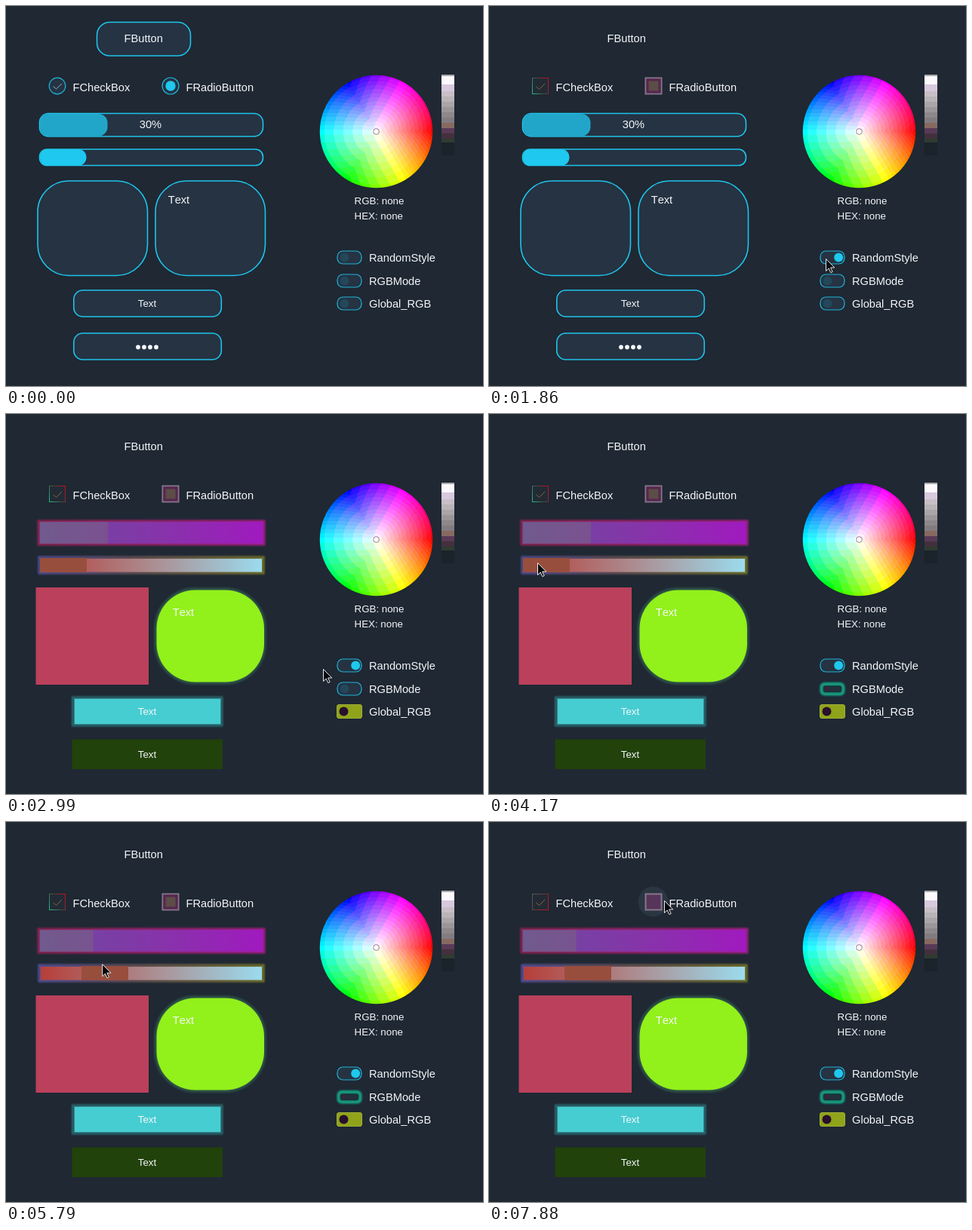
Recreate the animation shown at these times as an HTML page with a canvas. Size 632x504 px, loop 8000 ms.

```html
<!DOCTYPE html>
<html lang="en">
<head>
<meta charset="utf-8">
<title>Controls</title>
<style>
html, body { margin: 0; width: 100%; height: 100%; overflow: hidden; background: #1f2833; }
#stage { position: absolute; left: 0; top: 0; width: 632px; height: 504px; }
#wheel { position: absolute; left: 415px; top: 91px; }
svg { position: absolute; left: 0; top: 0; }
text { font: 14.67px "Liberation Sans", Arial, sans-serif; font-kerning: none; fill: #f4f6f8; }
.small { font-size: 13.33px; font-kerning: normal; text-anchor: middle; }
.info { font-size: 13.33px; }
.box { fill: #253343; stroke: #1fc4ea; stroke-width: 1.6; }
.thin { stroke: #1fb4d8; stroke-width: 1.2; }
.lit { fill: #1fc8ee; }
.dim { fill: #22485a; }
</style>
</head>
<body>
<div id="stage">
<canvas id="wheel" width="151" height="151"></canvas>
<svg width="632" height="504" viewBox="0 0 632 504">
  <defs>
    <linearGradient id="violet" gradientUnits="userSpaceOnUse" x1="44" y1="0" x2="341" y2="0">
      <stop stop-color="#6b4ba0"/><stop offset=".5" stop-color="#8436a8"/><stop offset="1" stop-color="#a01abf"/>
    </linearGradient>
    <linearGradient id="crimson" gradientUnits="userSpaceOnUse" x1="43" y1="0" x2="342" y2="0">
      <stop stop-color="#8e2452"/><stop offset="1" stop-color="#a01e86"/>
    </linearGradient>
    <linearGradient id="sunset" gradientUnits="userSpaceOnUse" x1="45" y1="0" x2="340" y2="0">
      <stop stop-color="#b63e38"/><stop offset=".5" stop-color="#ac8c90"/><stop offset="1" stop-color="#9bdcef"/>
    </linearGradient>
    <linearGradient id="rim" gradientUnits="userSpaceOnUse" x1="43" y1="0" x2="342" y2="0">
      <stop stop-color="#56509a"/><stop offset=".4" stop-color="#665058"/><stop offset="1" stop-color="#77762c"/>
    </linearGradient>
    <linearGradient id="edgeA" gradientUnits="userSpaceOnUse" x1="57" y1="112" x2="79" y2="100">
      <stop stop-color="#27b083"/><stop offset=".5" stop-color="#4b4440"/><stop offset="1" stop-color="#c01024"/>
    </linearGradient>
    <linearGradient id="edgeB" gradientUnits="userSpaceOnUse" x1="57" y1="100" x2="79" y2="112">
      <stop stop-color="#4f5a5c"/><stop offset=".5" stop-color="#70323a"/><stop offset="1" stop-color="#c41022"/>
    </linearGradient>
    <filter id="soft" x="-20%" y="-30%" width="140%" height="160%"><feGaussianBlur stdDeviation="1.2"/></filter>
  </defs>

  <!-- button -->
  <rect data-to="1400" class="box" x="120.5" y="21.5" width="124" height="44.5" rx="17" stroke-width="1.8"/>
  <rect id="hover" x="119" y="20" width="127" height="47" fill="#fff" opacity="0"/>
  <text x="156.5" y="48">FButton</text>

  <!-- check box -->
  <circle id="checkHalo" cx="68" cy="106" r="20" fill="#2a3641" opacity="0"/>
  <g data-to="1570">
    <circle class="box thin" cx="68" cy="106" r="10.8"/>
    <path d="M62.5 106.5l4 3.5 7.5-7" fill="none" stroke="#8fb4c2"/>
  </g>
  <g data-from="1570" data-to="6360" fill="none">
    <rect x="57.5" y="95.5" width="21" height="21" fill="#222b35" stroke="url(#edgeA)"/>
    <path d="M62.5 107l4 3.5 7.5-7.5" stroke="#7c6a38"/>
  </g>
  <g data-from="6360" fill="none">
    <rect x="57.5" y="95.5" width="21" height="21" fill="#222b35" stroke="url(#edgeB)"/>
    <path d="M62.5 107l4 3.5 7.5-7.5" stroke="#96642f"/>
  </g>
  <text x="88.5" y="113">FCheckBox</text>

  <!-- radio button -->
  <circle id="radioHalo" cx="217.5" cy="105.5" r="20" fill="#2a3641" opacity="0"/>
  <g data-to="1730">
    <circle class="box thin" cx="218" cy="106" r="11"/>
    <circle class="lit" cx="218" cy="106" r="6.7"/>
  </g>
  <g data-from="1730">
    <rect x="207.5" y="95.5" width="21" height="21" fill="#57345a" stroke="#85778a" stroke-width="2"/>
    <rect data-to="7870" x="210" y="98" width="16" height="16" fill="#5c4e46" stroke="#57264f" stroke-width="3"/>
  </g>
  <text x="238.5" y="113">FRadioButton</text>

  <!-- percent bar -->
  <g data-to="1920">
    <rect class="box" x="44.5" y="142.5" width="296" height="30.5" rx="12"/>
    <rect x="45" y="143" width="89.5" height="29.5" rx="12" fill="#21a6ca"/>
    <text x="176.8" y="162">30%</text>
  </g>
  <g data-from="1920">
    <rect x="43" y="142" width="299" height="31" fill="none" stroke="url(#crimson)" stroke-width="3" filter="url(#soft)"/>
    <rect x="44" y="142.7" width="297" height="29.6" fill="url(#violet)" stroke="url(#crimson)"/>
    <rect id="fill" x="45" y="143" width="90" height="29" fill="#7c7f62" opacity=".3"/>
  </g>

  <!-- sliding bar -->
  <g data-to="2100">
    <rect class="box" x="44.5" y="190" width="296" height="21.5" rx="10"/>
    <rect class="lit" x="45" y="190" width="61.5" height="21.5" rx="10"/>
  </g>
  <g data-from="2100">
    <rect x="44" y="190" width="297" height="21" fill="none" stroke="url(#rim)" stroke-width="3" filter="url(#soft)"/>
    <rect x="45.5" y="191.5" width="294" height="18.5" fill="url(#sunset)" stroke="url(#rim)"/>
    <rect id="chunk" x="45" y="191" width="62" height="19" fill="#984e3d"/>
  </g>

  <!-- text areas -->
  <rect data-to="2290" class="box" x="42" y="232" width="145.5" height="125.5" rx="41"/>
  <rect data-from="2290" x="39.5" y="230" width="149.5" height="129" fill="#bb405c"/>
  <g data-to="2470">
    <rect class="box" x="198" y="232" width="145.5" height="125.5" rx="41"/>
    <text x="214.7" y="262">Text</text>
  </g>
  <g data-from="2470">
    <rect x="197.5" y="231.5" width="146" height="126" rx="53" fill="#305f45" stroke="#2b4a45" stroke-width="3" filter="url(#soft)"/>
    <rect x="199.5" y="233.5" width="142.5" height="122" rx="51" fill="#92f01b"/>
    <text x="220.7" y="268">Text</text>
  </g>

  <!-- fields -->
  <rect data-to="2650" class="box" x="89.8" y="377" width="195.5" height="35" rx="12"/>
  <g data-from="2650">
    <rect x="88.5" y="376" width="197.5" height="37" fill="none" stroke="#2b6a72" stroke-width="3" filter="url(#soft)"/>
    <rect x="90.5" y="377.5" width="194" height="34" fill="#46cdd1"/>
  </g>
  <text class="small" x="187" y="399">Text</text>
  <g data-to="2810">
    <rect class="box" x="89.8" y="434" width="195.5" height="35" rx="12"/>
    <g fill="#f4f6f8">
      <circle cx="175" cy="452.5" r="2.9"/><circle cx="183" cy="452.5" r="2.9"/>
      <circle cx="191" cy="452.5" r="2.9"/><circle cx="199" cy="452.5" r="2.9"/>
    </g>
  </g>
  <g data-from="2810">
    <rect x="87.5" y="431.5" width="199.5" height="39.5" fill="#21420a"/>
    <text class="small" x="187" y="456">Text</text>
  </g>

  <!-- colour picker -->
  <circle cx="490.5" cy="166.5" r="3.9" fill="none" stroke="#858585"/>
  <g id="shades"></g>
  <text class="info" x="461.5" y="263">RGB: none</text>
  <text class="info" x="461.5" y="283">HEX: none</text>

  <!-- switches -->
  <rect class="box thin" x="439" y="325" width="32" height="17" rx="7.5"/>
  <circle id="knob" cy="333.5" r="6"/>
  <text x="481" y="339">RandomStyle</text>
  <g data-to="3160">
    <rect class="box thin" x="439" y="356" width="32" height="17" rx="7.5"/>
    <circle class="dim" cx="448.5" cy="364.5" r="6"/>
  </g>
  <g data-from="3160">
    <rect x="440.5" y="358" width="29" height="13.5" rx="4" fill="#1f3038" stroke="#12a284" stroke-width="4" filter="url(#soft)"/>
    <rect x="443.5" y="361" width="23" height="7.5" rx="2" fill="#22303a" stroke="#153238"/>
    <circle cx="447.5" cy="364.7" r="3" fill="#38263e"/>
  </g>
  <text x="481" y="370">RGBMode</text>
  <g data-to="2990">
    <rect class="box thin" x="439" y="386" width="32" height="17" rx="7.5"/>
    <circle class="dim" cx="448.5" cy="394.5" r="6"/>
  </g>
  <g data-from="2990">
    <rect x="438.5" y="385.5" width="33" height="18" rx="2.5" fill="#8fa31b" stroke="#a0b032"/>
    <circle cx="447.5" cy="394.5" r="6" fill="#290f2e"/>
  </g>
  <text x="481" y="400">Global_RGB</text>

  <!-- pointer -->
  <circle id="press" r="12" fill="#c8b81e" opacity=".75"/>
  <path id="arrow" d="M.5.5V16.5L4.2 13 6.8 18.6 9.2 17.5 6.6 12H11.8Z" fill="#05070a" stroke="#e6e8ea"/>
</svg>
</div>
<script>
const LOOP = 8000;
const $ = id => document.getElementById(id);
const clamp = (v, a, b) => Math.min(b, Math.max(a, v));
const ramp = (t, a, b) => { const u = clamp((t - a) / (b - a), 0, 1); return u * u * (3 - 2 * u); };
const pulse = (t, a, b, c, d) => ramp(t, a, b) * (1 - ramp(t, c, d));

// pointer tip: time, x, y
const PATH = [
  [80, 551, 506], [240, 520, 462], [440, 389, 432], [660, 412, 384], [870, 441, 352],
  [960, 446, 336], [1780, 446, 335], [1860, 446, 335], [2080, 452, 339], [2470, 420, 338],
  [3180, 420, 338], [3500, 330, 262], [3800, 195, 184], [3950, 144, 166], [4130, 64, 197],
  [4220, 64, 197], [4500, 98, 199], [4760, 161, 200], [5000, 212, 197], [5200, 262, 193],
  [5300, 270, 193], [5550, 134, 194], [5620, 131, 194], [5720, 131, 194], [6180, 70, 101],
  [6460, 70, 101], [6700, 129, 80], [6960, 188, 44], [7260, 205, 44], [7480, 226, 90],
  [7640, 230, 104], [7860, 230, 104], [7880, 232, 104], [8000, 232, 104]
];
const PRESSES = [[970, 1060], [4210, 5610], [6240, 6350], [7800, 7870]];

function slope(i, k) {
  const p = PATH[i - 1], q = PATH[i], r = PATH[i + 1];
  if (!p || !r || (q[k] - p[k]) * (r[k] - q[k]) <= 0) return 0;
  return (r[k] - p[k]) / (r[0] - p[0]);
}

function tipAt(t) {
  let i = 0;
  while (i < PATH.length - 2 && t >= PATH[i + 1][0]) i++;
  const a = PATH[i], b = PATH[i + 1], d = b[0] - a[0];
  const u = clamp((t - a[0]) / d, 0, 1), v = 1 - u;
  return [1, 2].map(k =>
    a[k] * v * v * (1 + 2 * u) + b[k] * u * u * (1 + 2 * v) +
    d * u * v * (slope(i, k) * v - slope(i + 1, k) * u));
}

function paintWheel() {
  const c = $('wheel').getContext('2d'), img = c.createImageData(151, 151);
  const step = [6, 14, 8];
  for (let y = 0; y < 151; y++) for (let x = 0; x < 151; x++) {
    const dx = x - 75, dy = y - 75, r = Math.hypot(dx, dy), s = Math.min(1, r / 75);
    const h = (Math.atan2(dy, dx) / Math.PI * 3 + 6) % 6, o = (y * 151 + x) * 4;
    [5, 3, 1].forEach((n, k) => {
      const m = (n + h) % 6;
      const v = 1 - s * clamp(Math.min(m, 4 - m), 0, 1);
      img.data[o + k] = Math.round(v * step[k]) / step[k] * 255;
    });
    img.data[o + 3] = 255 * clamp(75.2 - r, 0, 1);
  }
  c.putImageData(img, 0, 0);
}

function paintShades() {
  const bands = [
    [91, '#a9a9ac'], [93, '#fbf9fb'], [104, '#d9c9dd'], [113, '#c9bfc6'], [120, '#bab4b8'],
    [127, '#aaa5a8'], [134, '#9b9699'], [141, '#8d888b'], [148, '#827c80'], [155, '#866a62'],
    [162, '#593a56'], [169, '#43303f'], [176, '#303b31'], [181, '#1a232a'], [198, '']
  ];
  $('shades').innerHTML = bands.slice(0, -1).map(([y, col], i) =>
    `<rect x="577" y="${y}" width="17" height="${bands[i + 1][0] - y}" fill="${col}"/>`).join('');
}

const timed = [...document.querySelectorAll('[data-from],[data-to]')].map(el =>
  ({ el, from: +(el.dataset.from || 0), to: +(el.dataset.to || LOOP) }));

function draw(t) {
  for (const { el, from, to } of timed) el.style.display = t >= from && t < to ? '' : 'none';

  const [x, y] = tipAt(t);
  const shift = `translate(${x.toFixed(1)} ${y.toFixed(1)})`;
  $('arrow').setAttribute('transform', shift);
  $('arrow').style.display = t < 90 ? 'none' : '';
  $('press').setAttribute('transform', shift);
  $('press').style.display = PRESSES.some(([a, b]) => t >= a && t < b) ? '' : 'none';

  const on = ramp(t, 1060, 1300);
  $('knob').setAttribute('cx', 448.5 + 14.7 * on);
  $('knob').setAttribute('class', on > 0.3 ? 'lit' : 'dim');

  // dragging the sliding bar also sets the percent bar
  const left = t < 4210 ? 45 : clamp((t < 5610 ? x : 131) - 31, 45, 279);
  $('chunk').setAttribute('x', left);
  $('fill').setAttribute('width', t < 4210 ? 90 : Math.min(296, 1.285 * (left - 45)));

  $('checkHalo').setAttribute('opacity', pulse(t, 6380, 6480, 6540, 6680));
  $('radioHalo').setAttribute('opacity', ramp(t, 7480, 7650));
  $('hover').setAttribute('opacity', 0.05 * pulse(t, 6880, 7050, 7290, 7480));
}

paintWheel();
paintShades();
draw(0);
let start;
requestAnimationFrame(function tick(now) {
  if (start === undefined) start = now;
  draw((now - start) % LOOP);
  requestAnimationFrame(tick);
});
</script>
</body>
</html>
```
